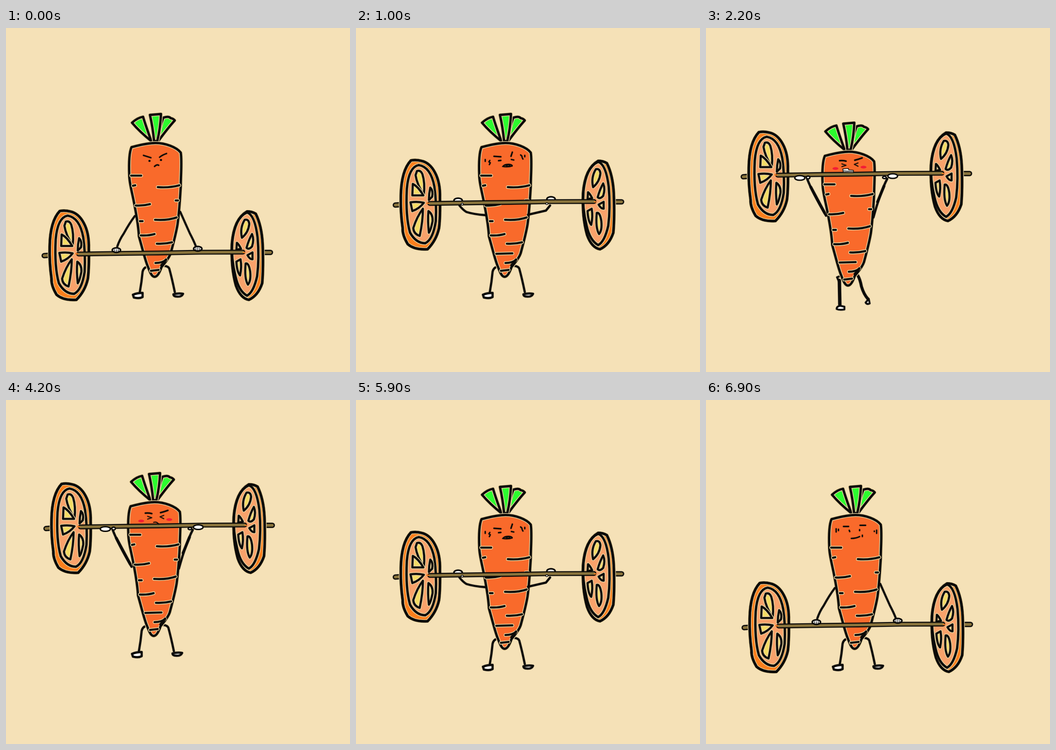
Animation of 748x748 px, one loop 7900 ms. Source, as an HTML page with a canvas:

```html
<!DOCTYPE html>
<html lang="en">
<head>
<meta charset="utf-8">
<title>Carrot weightlifter</title>
<style>
  html, body { margin: 0; width: 100%; height: 100%; overflow: hidden; background: #f5e1b7; }
  canvas { display: block; }
</style>
</head>
<body>
<canvas id="stage" width="748" height="748"></canvas>
<script>
const ctx = document.getElementById('stage').getContext('2d');
ctx.lineCap = ctx.lineJoin = 'round';

const BLACK = '#0b0a08', SOFT = 'rgba(11,10,8,.35)', SAND = '#f5e1b7', HALO = '#f2dba6',
  CARROT = '#f96a2b', LEAF = '#2cfb2f', RIND = '#fb7f1d', PULP = '#f8a26b',
  SEGMENT = '#f3dc64', WOOD = '#8a743c';

function stroke(d, width, color) {
  const path = new Path2D(d);
  const pass = (w, c) => {
    ctx.lineWidth = w;
    ctx.strokeStyle = c;
    ctx.stroke(path);
  };
  if (!color) pass(width + 1.4, SOFT); // soft brush edge
  pass(width, color || BLACK);
}

function fill(d, color) {
  ctx.fillStyle = color;
  ctx.fill(new Path2D(d));
}

// Filled shape with a pale rim beside its black outline
function shape(d, color, width = 4.8) {
  if (color) fill(d, color);
  stroke(d, width + 3.4, HALO);
  stroke(d, width);
}

function blob(x, y, rx, ry, color, line = 0) {
  ctx.beginPath();
  ctx.ellipse(x, y, rx, ry, 0, 0, 7);
  ctx.fillStyle = color;
  ctx.fill();
  if (!line) return;
  ctx.lineWidth = line;
  ctx.strokeStyle = BLACK;
  ctx.stroke();
}

function at([x, y], draw) {
  ctx.save();
  ctx.translate(x, y);
  draw();
  ctx.restore();
}

function carrot() {
  shape('M274 206Q286 195 298 193Q303 210 316 246Q291 226 274 206Z', LEAF);
  shape('M342 195Q354 191 358 196Q364 197 367 201Q354 215 331 246Q334 215 342 195Z', LEAF);
  shape('M313 189L337 187Q336 215 329 246L322 246Q319 215 313 189Z', LEAF);
  shape('M273 259C290 255 305 250 325 250C346 250 371 259 380 271C383 290 380 320 380 345' +
    'C378 375 377 397 373 427C370 445 364 468 358 490C354 502 345 511 338 520' +
    'C333 535 328 541 323 541C317 541 313 531 309 520C303 507 299 488 289 453' +
    'C288 430 284 410 280 388C274 355 268 338 268 320C267 295 268 270 273 259Z', CARROT);
  shape('M272 321H294M276 343L281 342M330 346Q355 348 377 342M369 375H374' +
    'M282 386Q298 387 313 383M291 420H297M324 417Q350 419 371 412M293 451Q310 452 323 448' +
    'M328 469Q345 470 361 466M305 491L340 490M325 511Q340 511 348 504M315 528L332 526', null, 4.2);
  stroke('M338 516L348 504', 5);
}

function feet(width, ...paths) {
  for (const foot of paths) {
    fill(foot, '#fff');
    stroke(foot, width);
  }
}

const legs = {
  stand() {
    stroke('M307 519Q299 521 297 530Q295 552 291 574M343 517Q353 518 355 523Q361 545 367 574', 4.4);
    feet(4.4, 'M276 580Q285 576 297 576L297 585Q290 589 278 586Z',
      'M364 579Q375 576 385 578Q382 585 372 584Q364 584 364 579Z');
  },
  step() {
    stroke('M293 539L285 542L289 551', 4);
    stroke('M290 549L291 601', 7);
    stroke('M330 538Q335 546 338 562Q343 579 352 589', 6);
    feet(3.6, 'M284 611Q284 605 292 604L301 606V612Q290 614 284 611Z',
      'M347 597L354 589L356 599Q350 602 347 597Z');
  }
};

function plate(rim, face, segments) {
  shape(rim, RIND);
  shape(face, PULP);
  stroke(rim, 4.8);
  segments.forEach(d => shape(d, SEGMENT, 4.2));
}

function barbell() {
  const rod = d => { stroke(d, 11); stroke(d, 6, WOOD); };
  rod('M83 495L96 494M563 488H575');

  plate('M117 398Q128 396 140 399Q158 403 169 424Q181 446 180 480Q181 520 178 545' +
    'Q172 572 153 591Q125 593 110 580Q98 560 99 545Q94 510 95 475Q96 420 117 398Z',
    'M134 408Q160 412 168 455Q173 490 171 530Q165 570 148 578Q128 578 115 555' +
    'Q105 520 108 460Q112 412 134 408Z', [
    'M130 421Q138 418 142 428Q148 447 145 473Q130 450 127 430Z',
    'M121 449Q133 455 144 474L120 474Z',
    'M116 489Q132 487 145 490Q135 503 120 508Z',
    'M143 503Q143 530 136 562Q123 558 122 545Q130 520 143 503Z',
    'M155 508Q165 515 164 530Q160 550 156 555Q153 530 155 508Z',
    'M159 457Q166 464 163 477L156 484Q156 470 159 457Z'
  ]);

  plate('M524 399Q535 399 543 404Q556 430 558 470Q560 520 557 555Q548 582 528 591' +
    'Q510 588 500 560Q489 520 491 470Q495 415 524 399Z',
    'M524 401Q541 406 547 455Q551 500 546 540Q538 575 524 582Q506 572 499 540' +
    'Q489 500 492 465Q498 412 524 401Z', [
    'M519 417Q528 415 529 426Q527 445 513 456Q508 435 519 417Z',
    'M535 448Q540 460 535 475Q528 483 523 478Q528 460 535 448Z',
    'M525 494L536 488V503Q530 503 525 494Z',
    'M521 512Q528 510 531 530Q533 550 526 558Q518 545 521 512Z',
    'M510 503Q513 520 509 538Q502 530 501 508Z',
    'M502 467Q506 470 511 480L501 482Z'
  ]);

  const bar = 'M158 491.5L260 490L330 489.3L420 487.6L515 487.3';
  stroke('M153 491H162', 8, PULP);
  stroke(bar, 10);
  stroke(bar, 5.6, WOOD);
  stroke('M151 491H156M516 488H519', 2.5, RIND);
}

const capHands = (...spots) => spots.forEach(([x, y]) => blob(x, y, 9, 5, '#fff', 3.4));

// Each arm pose: limbs pass behind the bar, hands in front where they grip it
const arms = {
  down: {
    back: () => stroke('M280 409Q268 425 256 447Q247 460 242 475M379 400Q390 425 400 447Q408 462 413 475', 4.2),
    front() {
      capHands([240, 483], [417, 480]);
      stroke('M236 485V482M240 486V482M244 486V482M413 483V479M417 484V478M421 483V479', 1);
    }
  },
  pull: {
    back() {
      stroke('M281 408Q262 424 238 424M377 403Q394 420 418 420', 4.2);
      capHands([232, 427], [422, 424]);
    },
    front() {}
  },
  chest: {
    back() {
      capHands([222, 375], [424, 372]);
      stroke('M282 407Q255 405 240 400Q232 395 225 386M374 406L413 397L422 386', 4.4);
    },
    front() {
      blob(231, 383, 2.4, 2, '#fff', 1.5);
      blob(415, 382, 2.4, 2, '#fff', 1.5);
    }
  },
  up: {
    back() {
      stroke('M235 317Q246 346 276 397M409 317Q394 346 379 401', 4.6);
      stroke('M243 335L273 391M402 333L388 367', 5.6);
    },
    front() {
      blob(237, 314, 4, 3, '#fff', 3);
      blob(403, 314, 4, 2.6, '#fff', 3);
      blob(219, 315, 11, 5, '#fff', 3);
      blob(421, 311, 10.5, 5, '#fff', 3);
    }
  }
};

const faces = {
  angry() {
    stroke('M299 277L315 282M334 281Q340 276 349 273M323 301Q328 296 332 298.5', 2.8);
    blob(312, 289, 2.5, 2.3, BLACK);
    blob(337, 287, 2.5, 2.2, BLACK);
  },
  sweating() {
    faces.angry();
    stroke('M283 288V293M288 288V291M366 289V291M371 288V294', 2.6);
  },
  effort() {
    stroke('M300 279L315 280M337 279L340 270M310 288.5L315 288M338 286L343 287', 2.8);
    stroke('M281 286V290M291 288L289 291L292 293L290 297M358 276L361 279M361 281L363 285M367 277V280', 2.6);
    fill('M317 302Q321 294 333 295Q342 296 341 301Q330 305 317 302Z', BLACK);
    stroke('M323 300H326M330 299H332M336 299H337', 1.2, '#9b431d');
  },
  strain() {
    blob(296, 291, 6.5, 3, '#f31d35');
    blob(357, 288, 6.5, 3, '#f31d35');
    stroke('M305 274Q312 273 319 275M338 273Q346 271 354 268', 3);
    stroke('M310 281L319 284L310 287M345 279L337 282L345 286', 1.8);
  },
  pout() {
    faces.strain();
    stroke('M323 294Q330 292 334 298', 1.8);
  },
  teeth() {
    at([0, -4.5], () => {
      faces.strain();
      const mouth = 'M312 292L324 291L325 294L335 295V300L313 299Z';
      fill(mouth, '#fff');
      stroke(mouth + 'M313 296L334 298', 1.2);
    });
  },
  relieved() {
    stroke('M299 275H310M335 272.5H347M311.5 283.5L312.5 286M334 282V284', 2.8);
    stroke('M316 301Q326 301 334 297M340 294V297M283 280V287M288 281V284M371 283V290M366 285V286', 2.6);
  }
};

const pose = (face, arm, bar, body = [0, 0], armShift = [0, 0], leg = 'stand') =>
  ({ face, arm, bar, body, armShift, leg });

const ready = pose('angry', 'down', [0, 0]);
const pull = pose('sweating', 'pull', [0, -57]);
const chest = pose('effort', 'chest', [2.5, -110]);
const press = pose('effort', 'up', [14.5, -182.5]);
const jump = pose('pout', 'up', [4, -215.5], [-2, -28], [-3, -34.5]);
const lunge = pose('teeth', 'up', [-2, -171.5], [-14.5, 19], [-15, 11], 'step');
const lower = pose('relieved', 'pull', [0, -57]);
const rest = pose('relieved', 'down', [0, 0]);

// [end time in ms, pose]
const timeline = [[500, ready], [1000, pull], [1500, chest], [2000, press], [2200, jump],
  [4200, lunge], [4400, jump], [5900, press], [6400, chest], [6900, lower], [7900, rest]];

function render(time) {
  const now = time % 7900;
  const p = timeline.find(([end]) => now < end)[1];
  ctx.fillStyle = SAND;
  ctx.fillRect(0, 0, 748, 748);
  at(p.leg === 'step' ? [0, 0] : p.body, legs[p.leg]);
  at(p.body, carrot);
  at(p.armShift, arms[p.arm].back);
  at(p.bar, barbell);
  at(p.armShift, arms[p.arm].front);
  at(p.body, faces[p.face]);
}

const start = performance.now();
function tick() {
  render(performance.now() - start);
  requestAnimationFrame(tick);
}
tick();
</script>
</body>
</html>
```
